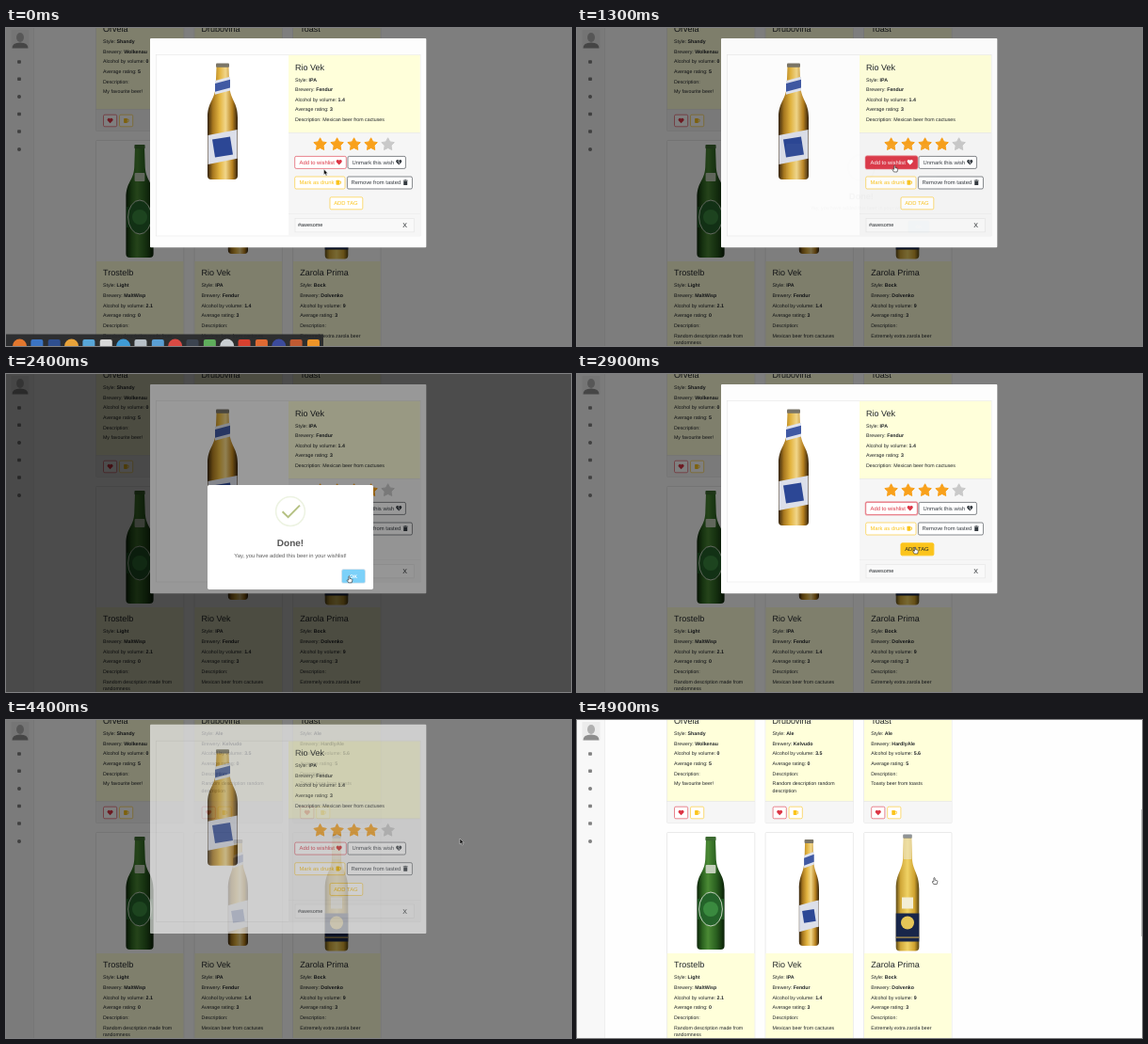
An HTML page for the animation above (5 s loop, 600 by 338 pixels).

```html
<!DOCTYPE html>
<html lang="en">
<head>
<meta charset="utf-8">
<title>Beer wishlist</title>
<style>
  html, body { margin: 0; width: 100%; height: 100%; overflow: hidden; background: #fefefe; }
  svg { display: block; width: 100%; height: 100%; }
  text { font: 5.25px "Liberation Sans", Arial, sans-serif; fill: #212529; text-rendering: geometricPrecision; white-space: pre; }
  .title { font-size: 9px; }
  .btn { font-size: 5.85px; }
  .bold { font-weight: bold; }
</style>
</head>
<body>
<svg id="stage" viewBox="0 0 600 338">
  <defs>
    <linearGradient id="green"><stop offset="0" stop-color="#0c2409"/><stop offset=".2" stop-color="#2c6420"/><stop offset=".4" stop-color="#4b8a35"/><stop offset=".7" stop-color="#2a6020"/><stop offset="1" stop-color="#0b2008"/></linearGradient>
    <linearGradient id="gold"><stop offset="0" stop-color="#35240d"/><stop offset=".18" stop-color="#a8781f"/><stop offset=".4" stop-color="#e3b440"/><stop offset=".6" stop-color="#f1d68a"/><stop offset=".82" stop-color="#b9821f"/><stop offset="1" stop-color="#33220c"/></linearGradient>
    <linearGradient id="amber"><stop offset="0" stop-color="#5f4c19"/><stop offset=".2" stop-color="#d0a738"/><stop offset=".5" stop-color="#f0d265"/><stop offset=".8" stop-color="#cfa22f"/><stop offset="1" stop-color="#584515"/></linearGradient>
  </defs>
</svg>
<script>
const LOOP = 5000;
const RED = '#dc3545', YELLOW = '#fbc41c', DARK = '#343a40', PALE = '#ffffda';
const stage = document.getElementById('stage');
const $ = id => document.getElementById(id);

const rect = (x, y, w, h, fill, extra = '') =>
  `<rect x="${x}" y="${y}" width="${w}" height="${h}" fill="${fill}" ${extra}/>`;
const text = (x, y, s, extra = '') => `<text x="${x}" y="${y}" ${extra}>${s}</text>`;
const group = (id, body, extra = '') => `<g id="${id}" ${extra}>${body}</g>`;
const outline = (color, w = .6) => `stroke="${color}" stroke-width="${w}"`;

// Icons, about 6 px wide, centred on (x, y)
const HEART = 'M0 2.8L-2.7 .1A1.6 1.6 0 0 1 0-1.9A1.6 1.6 0 0 1 2.7 .1Z';
const shapes = {
  heart: c => `<path d="${HEART}" fill="${c}"/>`,
  broken: (c, bg) => `<path d="${HEART}" fill="${c}"/><path d="M.3-2.2L-.6-.6L.6 .2L-.1 1.8" fill="none" ${outline(bg)}/>`,
  mug: c => rect(-2.5, -2.4, 3.7, 4.9, c, 'rx=".6"') + `<path d="M1.2-1.2H2.5V1.1L1.2 1.6" fill="none" ${outline(c, .8)}/>`,
  trash: c => rect(-2.4, -2.5, 4.8, .9, c) + rect(-.9, -3, 1.8, .6, c) + rect(-2, -1.3, 4, 4.2, c, 'rx=".4"')
};
const icon = (name, x, y, color, bg = '#fff') =>
  `<g transform="translate(${x} ${y})">${shapes[name](color, bg)}</g>`;

// Bottle with its top at y, half-widths w (body) and n (neck), height h
function bottle(cx, y, w, n, h, skin, cap, label) {
  return `<g transform="translate(${cx} ${y})">
    <path d="M${-n} 2L${-n * 1.15} ${h * .2}C${-n * 1.3} ${h * .32} ${-w} ${h * .33} ${-w} ${h * .47}
      V${h - 4}Q${-w} ${h} ${-w + 4} ${h}H${w - 4}Q${w} ${h} ${w} ${h - 4}V${h * .47}
      C${w} ${h * .33} ${n * 1.3} ${h * .32} ${n * 1.15} ${h * .2}L${n} 2Z" fill="url(#${skin})"/>
    ${rect(-n - .6, 0, 2 * n + 1.2, h * .035, cap, 'rx="1"')}${label}</g>`;
}
// Slanted band across a bottle: half-width, top, bottom and rise to the right
const band = (w, top, low, rise, fill) =>
  `<path d="M${-w} ${top}L${w} ${top - rise}V${low - rise}L${-w} ${low}Z" fill="${fill}"/>`;
const blueBottle = (cx, y, w, h) => bottle(cx, y, w, w * .4, h, 'gold', '#7a7568',
  band(w * .5, h * .15, h * .27, h * .035, '#dfe3ee') + band(w * .5, h * .175, h * .245, h * .035, '#4059a3') +
  band(w * .97, h * .62, h * .87, h * .05, '#dcdfe9') +
  rect(-w * .6, h * .72 - w * .6, w * 1.2, w * 1.2, '#2c4795', `transform="rotate(-9 0 ${h * .72})"`));

const bottles = [
  () => bottle(142, 124, 14.6, 5, 120, 'green', '#3c6a30',
    rect(-5.4, 30, 10.8, 9, '#c3cfba', 'rx="1"') + rect(-14, 66, 28, 22, '#1d5420') +
    `<ellipse cy="77" rx="12.4" ry="18" fill="#24632a" ${outline('#c8d3c0', 1)}/>
     <circle cy="77" r="8" fill="#3a8a3f"/>`),
  () => blueBottle(246.4, 127, 10.6, 113),
  () => bottle(351, 121.5, 12.3, 4.2, 124, 'amber', '#8f9396',
    rect(-4.2, 4.5, 8.4, 22, '#efecd8', 'opacity=".55"') + rect(-6, 67, 12, 12, '#f3eed6') +
    rect(-12.3, 84, 24.6, 30, '#18264a') + rect(-12.3, 109, 24.6, 1.2, '#b99b4e') +
    '<circle cy="94" r="7" fill="#e6c657"/>')
];

const facts = b => [['Style:', b.style], ['Brewery:', b.brewery], ['Alcohol by volume:', b.abv], ['Average rating:', b.rating]];
const info = (x, y, b) => text(x, y, b.name, 'class="title"') +
  facts(b).map(([k, v], i) => text(x, y + 11.9 + i * 10.65, `${k} <tspan class="bold">${v}</tspan>`)).join('');
const beer = (name, style, brewery, abv, rating, ...notes) => ({ name, style, brewery, abv, rating, notes });

const mig = beer('Rio Vek', 'IPA', 'Fendur', '1.4', 3, 'Mexican beer from cactuses');
const rows = [
  [beer('Orvela', 'Shandy', 'Wolkenau', 0, 5, 'My favourite beer!'),
   beer('Drubovina', 'Ale', 'Kelvudo', '3.5', 0, 'Random description random', 'description'),
   beer('Toast', 'Ale', 'HardlyAle', '5.6', 5, 'Toasty beer from toasts')],
  [beer('Trostelb', 'Light', 'MaltWisp', '2.1', 0, 'Random description made from', 'randomness'),
   mig,
   beer('Zarola Prima', 'Bock', 'Dolvenko', 9, 3, 'Extremely extra zarola beer')]
];

function card(b, row, col) {
  const x = 95.5 + col * 104.6, top = row ? 119.5 : -140, base = row ? 263.4 : 4.2, tx = x + 7.5;
  let s = rect(x, top, 93.3, row ? 260 : 249.5, '#fff', `${outline('#dedede')} rx="1"`) +
    rect(x + .3, row ? 248 : -12, 92.7, row ? 100 : 98.5, PALE) +
    info(tx, base, b) + text(tx, base + 54.5, 'Description:') +
    b.notes.map((n, i) => text(tx, base + 65.1 + i * 7.9, n)).join('');
  if (row) return s + bottles[col]();
  const small = (bx, c, name) => rect(bx, 92.2, 14.2, 12.6, '#fff', `${outline(c)} rx="1.4"`) + icon(name, bx + 7.1, 98.4, c);
  return s + rect(x + .3, 86.5, 92.7, 22.8, '#f6f6f6') + rect(x, 86.3, 93.3, .5, '#dedede') +
    small(x + 8, RED, 'heart') + small(x + 25, YELLOW, 'mug');
}

function sidebar() {
  const marks = [36, 54.3, 73, 91.5, 110, 129].map((y, i) =>
    i % 3 == 2 ? `<circle cx="14" cy="${y}" r="2" fill="#808080"/>` : rect(12.1, y - 1.7, 3.8, 3.4, '#808080', 'rx=".7"'));
  return rect(0, 0, 29, 338, '#f8f8f8') + rect(29, 0, .6, 338, '#e4e4e4') +
    rect(5.5, 2, 19, 19.5, '#ececec') +
    '<path d="M6.5 21.5Q6.5 15.5 15 15.5T23.5 21.5Z" fill="#8d8d8d"/><ellipse cx="15" cy="10" rx="4" ry="5" fill="#b0b0b0"/>' +
    marks.join('');
}

function button(x, y, w, label, tx, color, glyph, gx, on) {
  const ink = on ? (color == RED ? '#fff' : '#212529') : color;
  return rect(x, y, w, 13, on ? color : '#fff', `${outline(color)} rx="1.5"`) +
    text(tx, y + 8.3, label, `class="btn" style="fill:${ink}"`) +
    (glyph ? icon(glyph, gx, y + 6.2, ink) : '');
}
const addWish = on => button(306.7, 136.4, 54.6, 'Add to wishlist', 311.5, RED, 'heart', 353.7, on);
const addTag = on => button(344, 179.8, 34.8, 'ADD TAG', 348.2, YELLOW, '', 0, on);

function star(cx, cy, color) {
  const pts = Array.from({ length: 10 }, (_, i) => {
    const a = (i / 5 - .5) * Math.PI, r = i % 2 ? 3.6 : 7;
    return `${cx + r * Math.cos(a)},${cy + r * Math.sin(a)}`;
  });
  return `<polygon points="${pts.join(' ')}" fill="${color}" ${outline(color, 1)} stroke-linejoin="round"/>`;
}

const dialog = rect(153, 11, 293.3, 222.3, '#fdfdfd', 'rx="1"') +
  rect(159.5, 28.5, 280.5, 192.5, '#fff', outline('#e6e6e6')) +
  rect(300, 28.8, 139.7, 82.5, PALE) + rect(300, 111.3, 139.7, 109.4, '#f6f6f6') + rect(300, 111, 139.7, .5, '#dedede') +
  blueBottle(230, 37.5, 16, 123.5) + info(307, 44.6, mig) +
  text(307, 99.2, 'Description: ' + mig.notes[0]) +
  [0, 1, 2, 3, 4].map(i => star(333.6 + i * 18, 123.8, i < 4 ? '#f9a11b' : '#c9c9c9')).join('') +
  rect(306.2, 135.9, 55.6, 14, 'none', `id="ring" rx="2" ${outline('rgba(220,53,69,.4)', 1.1)}`) +
  addWish(false) + group('wishOn', addWish(true)) +
  button(363, 136.4, 61.4, 'Unmark this wish', 367.6, DARK, 'broken', 417.2) +
  button(306.7, 158, 53.3, 'Mark as drunk', 311.5, YELLOW, 'mug', 353) +
  button(362.4, 158, 69, 'Remove from tasted', 366.6, DARK, 'trash', 424.2) +
  addTag(false) + group('tagOn', addTag(true)) +
  rect(300, 197.5, 139.7, .4, '#e3e3e3') + rect(307, 202.3, 126.2, 14.6, '#f9f9f9', outline('#e0e0e0', .5)) +
  text(310, 211.4, '#awesome', 'style="font-size:5.45px"') + text(421.3, 212.4, 'X', 'style="font-size:7px"');

const alertBox = rect(214, 118, 176, 111, '#fff', 'rx="1.8"') +
  `<circle cx="302" cy="146" r="15.4" fill="none" ${outline('#edf3e2', 1.5)}/>
   <path id="arc" d="M317.4 146A15.4 15.4 0 0 1 307.3 160.5" fill="none" ${outline('#c2cc94', 1.5)}/>
   <path id="check" d="M293.6 146.2L299.6 152.2L312 139.6" pathLength="1" stroke-dasharray="1 2" fill="none" ${outline('#b5c183', 2)}/>` +
  text(302, 182.8, 'Done!', 'class="bold" text-anchor="middle" style="font-size:10px;fill:#555"') +
  text(302, 195, 'Yay, you have added this beer in your wishlist!', 'class="btn" text-anchor="middle" style="fill:#5c5c5c"') +
  rect(356.2, 207.2, 25.6, 15.4, '#c5dbea', 'rx="2.2"') + rect(357, 208, 24, 13.8, '#7cd1f9', 'rx="1.6"') +
  text(369, 216.9, 'OK', 'class="bold" text-anchor="middle" style="fill:#fff"');

const tints = ['#e2772e', '#3b74c4', '#2f4f8f', '#e8a33a', '#58a6d8', '#d8d8d8', '#3f9bd6', '#b8c0c8', '#5a9fd4',
  '#d94a44', '#3c4450', '#5fae5c', '#c9ced2', '#d8402f', '#e06a33', '#3b4a9c', '#c05a32', '#ee9428'];
const dock = rect(0, 325.5, 337, 20, '#26282a', 'opacity=".92"') + tints.map((c, i) => {
  const x = 14.5 + i * 18.35;
  return i % 3 ? rect(x - 6.5, 331, 13, 13, c, 'rx="2"') : `<circle cx="${x}" cy="338" r="7.5" fill="${c}"/>`;
}).join('');

const arrow = `<path d="M0 0V6L1.4 4.8L2.4 7L3.4 6.5L2.5 4.4H4.2Z" fill="#111" ${outline('#fff', .4)}/>`;
const hand = `<path d="M-.6 .4Q0-.5 .6 .4V2.6L2.9 3.2Q3.5 3.5 3.3 4.4L2.7 7H-.8L-2.3 4.5Q-2.3 3.5-.6 4.3Z" fill="#fff" ${outline('#222', .6)}/>`;

stage.insertAdjacentHTML('beforeend',
  sidebar() + rows.map((r, j) => r.map((b, i) => card(b, j, i)).join('')).join('') +
  rect(599, 95, 1, 135, '#c4c4c4', 'id="scroll"') +
  rect(0, 0, 600, 338, '#000', 'id="backdrop"') + group('modal', dialog) +
  rect(0, 0, 600, 338, '#000', 'id="shade"') + group('alert', alertBox) +
  group('dock', dock) + group('arrow', arrow) + group('hand', hand));

const clamp = v => Math.max(0, Math.min(1, v));
const ramp = (t, a, b) => clamp((t - a) / (b - a));
const smooth = p => p * p * (3 - 2 * p);
const fade = (id, v) => $(id).setAttribute('opacity', v);
const move = (id, v) => $(id).setAttribute('transform', v);

// Interpolates [time, ...values] keys
function track(t, keys, ease = p => p) {
  let i = 0;
  while (i < keys.length - 2 && t >= keys[i + 1][0]) i++;
  const [a, b] = [keys[i], keys[i + 1]], p = ease(ramp(t, a[0], b[0]));
  return a.slice(1).map((v, k) => v + (b[k + 1] - v) * p);
}

const path = [[0, 337.5, 150], [650, 337.5, 150], [800, 337.3, 146], [1700, 337.3, 146], [2200, 364.5, 214.8],
  [2450, 364.5, 214.8], [2780, 359, 184], [3150, 359, 184], [3450, 425, 158], [3800, 482, 126],
  [4600, 482, 126], [4880, 379.5, 167.5]];
const pop = [[0, .7], [.45, 1.05], [.8, .95], [1, 1]];
const within = (t, a, b) => t >= a && t < b;

function draw(t) {
  move('dock', `translate(0 ${14 * ramp(t, 60, 380)})`);

  const out = ramp(t, 4330, 4630);
  fade('modal', 1 - ramp(t, 4345, 4495));
  move('modal', `translate(0 ${-18 * (1 - (1 - out) ** 1.6)})`);
  fade('backdrop', .5 * (1 - ramp(t, 4420, 4570)));
  fade('scroll', t >= 4570 ? 1 : 0);
  fade('wishOn', ramp(t, 680, 830) * (1 - ramp(t, 1380, 1530)));
  fade('ring', within(t, 1200, 3500) ? 1 : 0);
  fade('tagOn', ramp(t, 2700, 2850) * (1 - ramp(t, 3200, 3350)));

  const show = ramp(t, 1220, 1520), hide = 1 - smooth(ramp(t, 2450, 2730));
  const seen = smooth(show) ** 2 * hide, size = track(show, pop)[0];
  fade('shade', .4 * seen);
  fade('alert', seen);
  move('alert', `translate(302 173.5) scale(${size}) translate(-302 -173.5)`);
  move('arc', `rotate(${-360 * ramp(t, 1480, 1760)} 302 146)`);
  fade('arc', 1 - ramp(t, 1700, 1780));
  $('check').setAttribute('stroke-dashoffset', 1 - smooth(ramp(t, 1660, 2010)));
  fade('check', t > 1660 ? 1 : 0);

  const [x, y] = track(t, path, smooth);
  const over = within(t, 700, 1350) || within(t, 2120, 2500) || within(t, 2720, 3230) || (t > 4600 && x < 398);
  for (const id of ['arrow', 'hand']) {
    move(id, `translate(${x} ${y})`);
    fade(id, (id == 'hand') == over ? 1 : 0);
  }
}

const start = performance.now();
function tick() {
  draw((performance.now() - start) % LOOP);
  requestAnimationFrame(tick);
}
tick();
</script>
</body>
</html>
```
